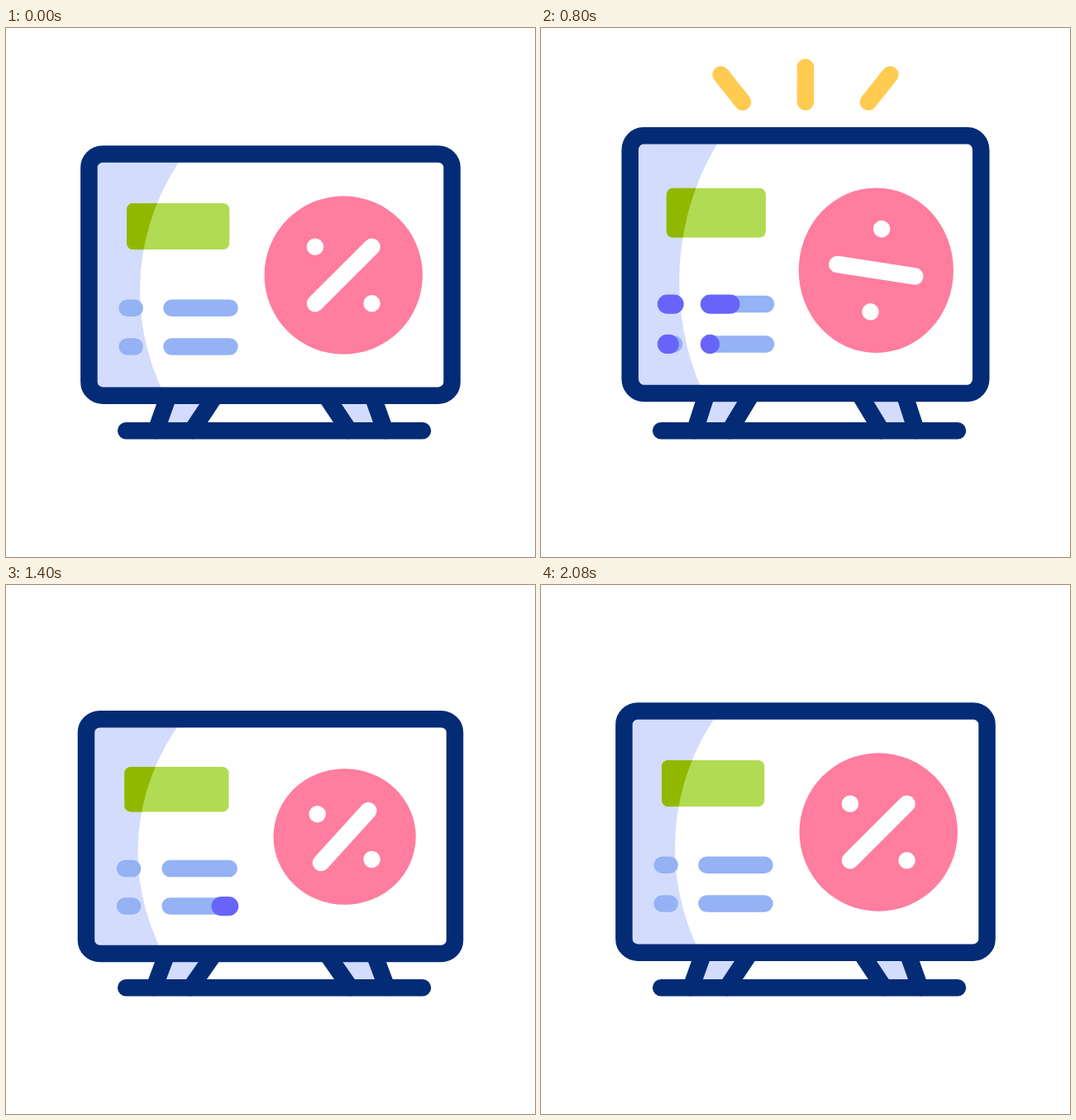
These frames come from a looping animation (640x640 px, 2.42 s). An HTML page with a canvas:

```html
<!DOCTYPE html>
<html lang="en">
<head>
<meta charset="utf-8">
<title>Discount on screen</title>
<style>
  html, body { margin: 0; width: 100%; height: 100%; overflow: hidden; background: #fff; }
  canvas { display: block; width: 640px; height: 640px; }
</style>
</head>
<body>
<canvas id="stage" width="640" height="640"></canvas>
<script>
const ctx = document.getElementById('stage').getContext('2d');
const LOOP = 2420;
const STROKE = 20.5;
const MID = 320, FLOOR = 487.3;
const NAVY = '#032b76', SHADE = '#d3dcfd', PINK = '#ff7d9f', LIME = '#b1db52',
      OLIVE = '#91b800', SKY = '#94b2f4', VIOLET = '#6864fa', YELLOW = '#ffcb51';

// Rest, squash, stretch, squash, small stretch, rest
const BEATS = [200, 580, 890, 1285, 1535, 2080];
const WIDE = [1, 1.046, .947, 1.046, .978, 1];
const TALL = [1, .93, 1.1, .93, 1.021, 1];
const TALL_INNER = [1, .93, 1.056, .93, 1.021, 1]; // bars and badge stretch less
const PULSE_BEATS = [200, 580, 900, 1090, 1385, 1640, 2080];
const PULSE = [1, .93, 1.036, 1.028, .884, 1.072, 1];

const mix = (a, b, k) => a + (b - a) * k;
const ease = k => k * k * (3 - 2 * k);
const ramp = (t, from, time) => ease(Math.min(1, Math.max(0, (t - from) / time)));
const track = (t, beats, values) => values.reduce((sum, value, i) =>
  i ? sum + (value - values[i - 1]) * ramp(t, beats[i - 1], beats[i] - beats[i - 1]) : value, 0);

// Strokes keep their width whatever the current scale is
function stroke(path, color, width = STROKE) {
  ctx.save();
  ctx.beginPath();
  path();
  ctx.resetTransform();
  ctx.strokeStyle = color;
  ctx.lineWidth = width;
  ctx.lineCap = 'round';
  ctx.stroke();
  ctx.restore();
}

function fill(path, color) {
  ctx.beginPath();
  path();
  ctx.fillStyle = color;
  ctx.fill();
}

function line(x1, y1, x2, y2, color, width) {
  stroke(() => { ctx.moveTo(x1, y1); ctx.lineTo(x2 + .01, y2); }, color, width);
}

function trimmed(x1, y1, x2, y2, start, end, color, width) {
  if (end <= start) return;
  line(mix(x1, x2, start), mix(y1, y2, start), mix(x1, x2, end), mix(y1, y2, end), color, width);
}

// Scales about the middle of the floor
function scaled(sx, sy, paint) {
  ctx.save();
  ctx.translate(MID, FLOOR);
  ctx.scale(sx, sy);
  ctx.translate(-MID, -FLOOR);
  paint();
  ctx.restore();
}

function drawRays(t) {
  const start = ramp(t, 820, 190), end = ramp(t, 676, 187);
  for (const side of [-1, 0, 1]) {
    trimmed(MID + side * 76, 89.5, MID + side * 111.5, side ? 45 : 33, start, end, YELLOW);
  }
}

function drawLegs() {
  for (const side of [-1, 1]) {
    const x = v => MID + side * v;
    fill(() => {
      ctx.moveTo(x(123.5), 445);
      ctx.lineTo(x(138.5), 487);
      ctx.lineTo(x(95), 487);
      ctx.lineTo(x(67), 445);
    }, SHADE);
    line(x(123.5), 445, x(138.5), 487, NAVY);
    line(x(67), 445, x(95), 487, NAVY);
  }
}

function drawScreen() {
  const frame = () => ctx.roundRect(100.4, 152.4, 439.2, 292.3, 16.5);
  const label = () => ctx.roundRect(146, 212, 124.3, 56, 7.5);
  const shade = () => {
    ctx.moveTo(100.4, 152.4);
    ctx.arc(443, 318, 281, Math.PI + .63, Math.PI - .467, true);
    ctx.lineTo(100.4, 444.7);
  };
  fill(frame, '#fff');
  fill(shade, SHADE);
  fill(label, LIME);
  ctx.save();
  ctx.beginPath();
  shade();
  ctx.clip();
  fill(label, OLIVE);
  ctx.restore();
  stroke(frame, NAVY);
}

function drawBars(t) {
  for (const row of [0, 1]) {
    for (const long of [0, 1]) {
      const x1 = long ? 200.5 : 146.7, x2 = long ? 270.5 : 155.7;
      const y = 338.7 + 46.9 * row;
      const end = ramp(t, 580 + 160 * row + 58 * long, long ? 400 : 160);
      const start = ramp(t, 1100 + 70 * row, long ? 300 : 160);
      line(x1, y, x2, y, SKY);
      trimmed(x1, y, x2, y, start, end, VIOLET, 23.2);
    }
  }
}

function drawBadge(t) {
  const size = track(t, PULSE_BEATS, PULSE);
  const turn = track(t, [666, 1223, 1400, 1600], [0, 360, 356, 360]);
  const r = 34.3;
  ctx.save();
  ctx.translate(408.3, 299);
  ctx.scale(size, size);
  fill(() => ctx.arc(0, 0, 95.7, 0, 7), PINK);
  ctx.rotate(turn * Math.PI / 180);
  line(-r, r, r, -r, '#fff');
  for (const dot of [-r, r]) line(dot, dot, dot, dot, '#fff');
  ctx.restore();
}

function draw(t) {
  ctx.fillStyle = '#fff';
  ctx.fillRect(0, 0, 640, 640);
  drawRays(t);

  const wide = track(t, BEATS, WIDE);
  scaled(wide, track(t, BEATS, TALL), () => {
    drawLegs();
    drawScreen();
  });
  scaled(wide, track(t, BEATS, TALL_INNER), () => {
    drawBars(t);
    drawBadge(t);
  });

  line(145.2, FLOOR, 504, FLOOR, NAVY);
}

const begin = performance.now();
function tick() {
  draw((performance.now() - begin) % LOOP);
  requestAnimationFrame(tick);
}
tick();
</script>
</body>
</html>
```
